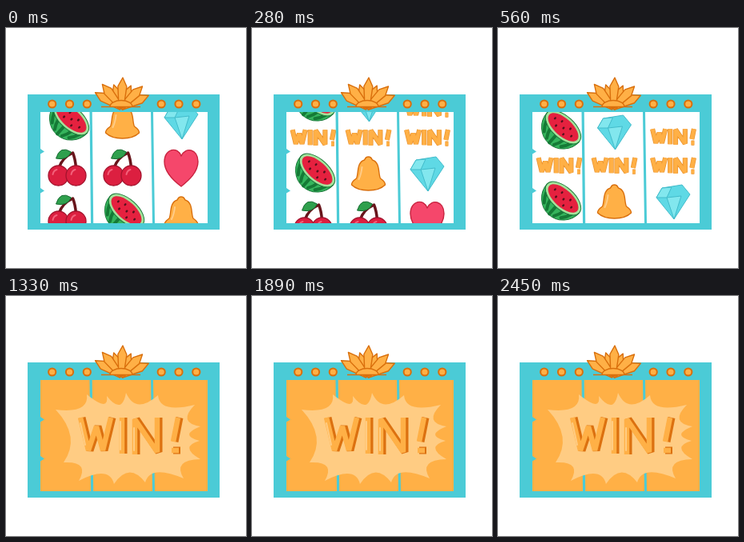
These frames come from a looping animation (300 px wide and 300 px high, 2940 ms). An HTML page:

```html
<!DOCTYPE html>
<html lang="en">
<head>
<meta charset="utf-8">
<title>Slot machine</title>
<style>
html, body { margin: 0; width: 100%; height: 100%; overflow: hidden; background: #fff; }
body > svg { display: block; width: 300px; height: 300px; }
path, circle, ellipse { stroke-linejoin: round; }
.gold { fill: #ffb046; stroke: #d96f0c; }
.line { fill: none; stroke-linecap: round; }
</style>
</head>
<body>
<svg viewBox="0 0 300 300">
  <defs>
    <g id="melon" transform="translate(5 -4) rotate(42)">
      <path d="M-27 0A27 27 0 0 0 27 0Z" fill="#35b45c" stroke="#197a3a"/>
      <path class="line" d="M-21 8Q-19 14-14 20M-11 12Q-10 18-6 24M0 13V26M11 12Q10 18 6 24M21 8Q19 14 14 20" stroke="#157a36" stroke-width="4"/>
      <ellipse rx="27" ry="14" fill="#a4e29a" stroke="#197a3a"/>
      <ellipse rx="23.5" ry="11" fill="#e5213f"/>
      <path class="line" d="M-15-2v1M-8 4v1M-6-5v1M1 0v1M6 6v1M8-5v1M15 1v1" stroke="#55101c" stroke-width="2.4"/>
    </g>
    <g id="cherry">
      <path class="line" d="M-10-1Q-6-13 7-19Q10-12 11 0" stroke="#68151b" stroke-width="3.5"/>
      <path d="M5-20Q-9-29-14-12Q0-9 5-20Z" fill="#2fa04d" stroke="#176b31"/>
      <g fill="#dc1f40" stroke="#a3132d" stroke-width="1.3">
        <circle cx="-11" cy="9.5" r="12.5"/>
        <circle cx="11" cy="9.5" r="12.5"/>
      </g>
      <path class="line" d="M-18 8Q-17 3-13 2M5 8Q6 3 10 2" stroke="#f3617a" stroke-width="2"/>
    </g>
    <g id="bell" class="gold" stroke-width="1.4">
      <path d="M0-21C4-21 4-18 5-17C15-14 12 0 15 6Q21 10 21 14Q14 21 0 21Q-14 21-21 14Q-21 10-15 6C-12 0-15-14-5-17C-4-18-4-21 0-21Z"/>
      <path class="line" d="M-8-8Q-9 1-12 7" stroke="#ffcc88" stroke-width="2"/>
    </g>
    <g id="diamond" stroke="#42bccb">
      <path d="M-14-17L11-21L21-9L1 22L-21-5Z" fill="#5fd9e5"/>
      <path d="M-14-17L-2-18L-8-5L-21-5ZM-8-5L10-7L1 22Z" fill="#82e7ee"/>
    </g>
    <path id="heart" d="M0 23C-12 14-21 4-21-8C-21-25-4-27 0-15C5-27 21-24 21-8C21 5 10 15 0 23Z" fill="#f5476b" stroke="#c8233f" stroke-width="1.4"/>
    <path id="letters" class="line" style="stroke-linecap:butt;stroke-linejoin:bevel"
      d="M5 1L15 42L25 12L33 42L43 1M57 1V46M73 47V3L101 44V1M127 1L121 31M119 42h9"/>
    <g id="win" transform="scale(.425) translate(-66 -24)">
      <use href="#letters" stroke="#ea932f" stroke-width="14.5"/>
      <use href="#letters" stroke="#ffb046" stroke-width="11"/>
    </g>
  </defs>

  <svg id="reels" x="43" y="105" width="209" height="139" viewBox="43 105 209 139"></svg>
  <rect class="prize" x="43" y="105" width="209" height="139" fill="#ffb046"/>
  <g fill="#4bcbd6">
    <path d="M27 83H267V252H27ZM43 105V244H252V105Z" fill-rule="evenodd" shape-rendering="crispEdges"/>
    <path d="M104.5 105h3.2l1.5 139h-3.2ZM181 105h3l2 139h-3ZM43 151l5 3.5l-5 3ZM43 200l5 3.5l-5 3Z"/>
  </g>
  <g id="lamps" class="gold" stroke-width="2"></g>
  <g id="crown" class="gold" stroke-width="1.4"></g>
  <path class="gold" d="M119 98.5H130A14 8 0 0 1 158 98.5H168M130 98.5H158" stroke-width="1.4"/>
  <path id="burst" class="prize" fill="#ffcc83"/>
  <g id="bigWin" transform="translate(90 151)">
    <use href="#letters" stroke="#dc7110" stroke-width="9"/>
    <use href="#letters" x="-2" stroke="#ffb046" stroke-width="6.5"/>
    <path class="line" d="M3 8l6 27M53 6v35M70 14v28" stroke="#ffcc83" stroke-width="2"/>
  </g>
</svg>
<script>
const $ = id => document.getElementById(id);
const add = (parent, tag, attrs) => {
  const el = document.createElementNS('http://www.w3.org/2000/svg', tag);
  for (const key in attrs) el.setAttribute(key, attrs[key]);
  return $(parent).appendChild(el);
};

// Each reel: centre, resting height of its first symbol, symbols downwards
const rows = [172, 217, 275, 332];
const symbols = [
  [76.5, 128, 'melon win melon cherry cherry'],
  [145.5, 130, 'diamond win bell cherry melon'],
  [219, 136, 'win win diamond heart bell']
].flatMap(([x, top, names]) => names.split(' ').map((name, i) => (
  { y: [top, ...rows][i], el: add('reels', 'use', { href: '#' + name, x }) }
)));

for (const middle of [79.5, 216])
  for (let i = -1; i <= 1; i++) add('lamps', 'circle', { cx: middle + 21.8 * i, cy: 95, r: 4.6 });

// Fan of rays, the inner pair shorter and behind
const addRay = i => {
  const len = Math.abs(i) === 1 ? 30 : 37.5;
  add('crown', 'path', {
    d: `M-3 0L-5.5 ${11 - len}L0 ${-len}L5.5 ${11 - len}L3 0Z`,
    transform: `translate(144 99.5) rotate(${3 + 21 * i})`
  });
};
[-1, 1, -3, 3, -2, 2, 0].forEach(addRay);

// Burst: tips joined by curves pulled towards the centre
const tips = [
  [62, 142], [101, 123], [126, 125], [150, 121], [190, 124], [236, 136], [243, 163],
  [242, 181], [243, 204], [222, 228], [174, 233], [135, 235], [91, 231], [72, 208]
];
const curves = tips.map(([x, y], i) => {
  const [nextX, nextY] = tips[(i + 1) % tips.length];
  const midX = (x + nextX) / 2, midY = (y + nextY) / 2;
  const pull = 27 / Math.hypot(153 - midX, 179 - midY);
  return `Q${midX + (153 - midX) * pull} ${midY + (179 - midY) * pull} ${nextX} ${nextY}`;
});
$('burst').setAttribute('d', 'M' + tips[0] + curves.join(''));

const show = (el, visible) => { el.style.display = visible ? '' : 'none'; };
const prize = document.querySelectorAll('.prize');
const start = performance.now();

function draw() {
  const t = (performance.now() - start) % 2940;
  // Eight slowing steps of 70 ms bring the reels to rest
  const step = Math.min(8, Math.floor(t / 70));
  const remaining = 100 - 20 * step + 0.9375 * step * step;
  for (const { el, y } of symbols) el.setAttribute('y', y - remaining);

  const won = t >= 1330;
  const blink = Math.min(4, Math.floor((t - 1330) / 280));
  show($('reels'), !won);
  prize.forEach(el => show(el, won));
  show($('bigWin'), won && blink % 2 === 0);
  requestAnimationFrame(draw);
}
draw();
</script>
</body>
</html>
```
